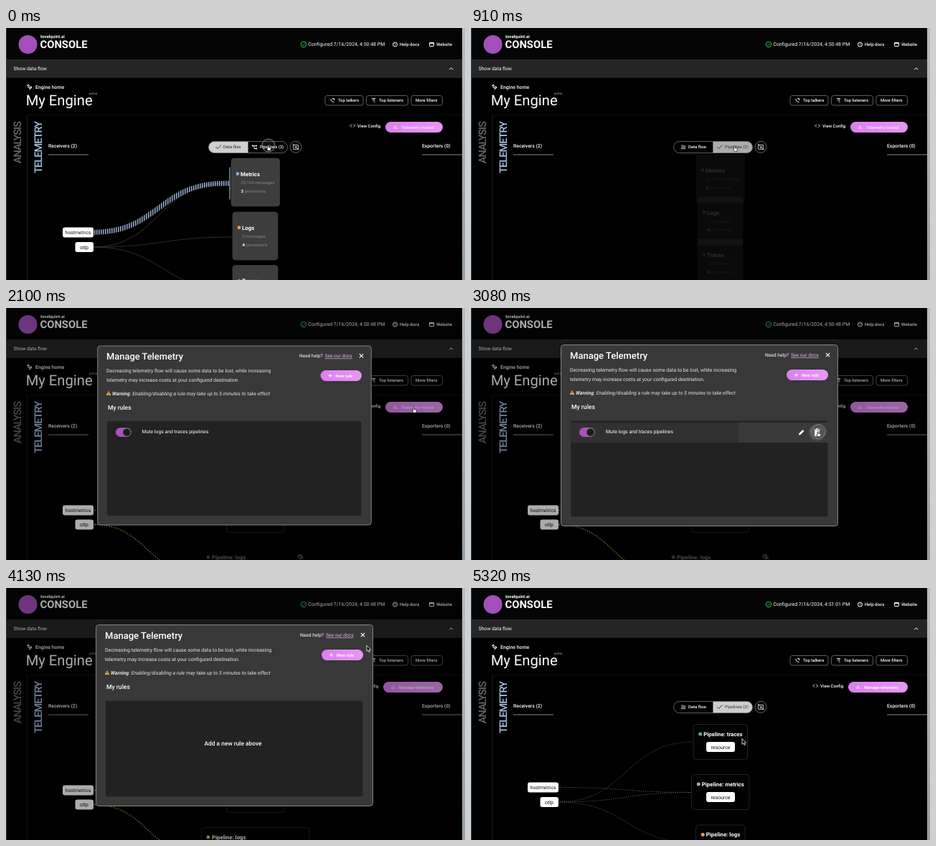
Animation of 640x352 px, one loop 5.39 s. Source, as an HTML page:

```html
<!DOCTYPE html>
<html lang="en">
<head>
<meta charset="utf-8">
<title>Console</title>
<style>
  html, body { margin: 0; width: 100%; height: 100%; overflow: hidden; background: #000; }
  svg { display: block; width: 100vw; height: 100vh; }
  text { font-family: Roboto, Arial, sans-serif; text-rendering: geometricPrecision; white-space: pre; }
</style>
</head>
<body>
<svg id="stage" viewBox="0 0 640 352"></svg>
<script>
const LOOP = 5390, STEP = 70;
const BLUE = '#8fadd9', TEAL = '#6d9fa6', GOLD = '#dda548';
const $ = id => document.getElementById(id);

// Drawing helpers; text is placed by its left edge and vertical centre.
const text = (x, y, s, size, fill = '#fff', weight = 400, more = '') =>
  `<text x="${x}" y="${(y + size * 0.36).toFixed(2)}" font-size="${size}" fill="${fill}" font-weight="${weight}" ${more}>${s}</text>`;
const box = (x, y, w, h, r, fill, stroke = 'none', more = '') =>
  `<rect x="${x}" y="${y}" width="${w}" height="${h}" rx="${r}" fill="${fill}" stroke="${stroke}" ${more}/>`;
const line = (d, stroke = '#fff', width = 1, more = '') =>
  `<path d="${d}" fill="none" stroke="${stroke}" stroke-width="${width}" ${more}/>`;
const dot = (x, y, r, fill, stroke = 'none', more = '') =>
  `<circle cx="${x}" cy="${y}" r="${r}" fill="${fill}" stroke="${stroke}" ${more}/>`;
const group = (id, body, more = '') => `<g id="${id}" ${more}>${body}</g>`;
const curve = (x1, y1, x2, y2) => {
  const m = (x1 + x2) / 2;
  return `M${x1} ${y1}C${m} ${y1} ${m} ${y2} ${x2} ${y2}`;
};
const check = (x, y, color) => line(`M${x - 3.5} ${y}l2.5 2.5l5 -5`, color, 1);
const chip = (x, y, w, label, pad, fill = '#fff', size = 7) =>
  box(x, y - 7, w, 14, 3, fill) + text(x + pad, y, label, size, '#111');

const pipeIcon = (x, y, c) =>
  line(`M${x - 3} ${y - 2}h2.5v4h3.5M${x - 0.5} ${y - 2}h3.5`, c, 0.9) + dot(x - 2.6, y - 2, 1.1, c) +
  dot(x + 2.6, y - 2, 1.1, c) + dot(x + 2.6, y + 2, 1.1, c);
const bars = (x, y) => line(`M${x - 2} ${y + 2.5}v-3M${x} ${y + 2.5}v-5M${x + 2} ${y + 2.5}v-2`, '#f7dcfb', 1);
const phone = (x, y) => line(`M${x - 2} ${y - 2}q0 4 4.5 4.5M${x} ${y - 2.5}h2.5v2.5`, '#fff', 1);
const ear = (x, y) => line(`M${x - 2.5} ${y - 2}h5M${x - 1.5} ${y}h3.5M${x} ${y + 2}l2 1`, '#fff', 1);

function header() {
  return box(0, 0, 636, 44.5, 0, '#050505') + dot(30.5, 23, 13, '#a34fb9') +
    text(48, 11.5, 'tovelquint.ai', 6.1, '#fff', 700) +
    text(47.5, 22.8, 'CONSOLE', 14.8, '#fff', 700) +
    dot(415, 23, 3.8, 'none', '#43b450') + line('M413 23l1.5 1.5l2.7 -3', '#43b450', 0.9) +
    `<g id="clock">${text(421.2, 22.8, '', 6.97)}</g>` +
    dot(542.5, 23, 3, 'none', '#fff') + text(541.2, 23, '?', 5, '#fff', 500) +
    text(549, 22.8, 'Help docs', 6.1, '#fff', 500) +
    box(590.5, 20.5, 6, 5, 0.6, 'none', '#fff') + line('M590 21.2h7', '#fff', 1.2) +
    text(600, 22.8, 'Website', 6.1, '#fff', 500) +
    box(0, 44.5, 636, 24.5, 0, '#252525') + line('M0 44.5H636M0 69H636', '#363636', 0.8) +
    text(10.5, 56.8, 'Show data flow', 6.8) + line('M618.2 58.2l2.5 -2.5l2.5 2.5', '#fff', 1);
}

function page() {
  const pill = (x, w, label, icon, tx) => box(x, 94.5, w, 13.5, 3, 'none', '#777', 'stroke-width=".8"') +
    icon + text(tx, 101.2, label, 5.95, '#fff', 500);
  const side = (x, y, s, fill) =>
    `<text transform="translate(${x} ${y}) rotate(-90)" font-size="14.5" font-weight="500" letter-spacing="-.95" fill="${fill}">${s}</text>`;
  const action = (id, x, label, fill) => group(id, box(x, 131, 609 - x, 15, 7.5, 'url(#pink)') + bars(x + 14, 138.5) +
    text(x + 22, 138.5, label, 5.95, fill, 500));
  return line('M31 79v4h5M29 81l2-2l2 2M34 81l2 2l-2 2M33 83v3.5', '#fff', 1) +
    text(41, 82.7, 'Engine home', 6.9, '#fff', 500) +
    text(27.7, 101, 'My Engine', 20.2, '#fff', 400) + text(115.5, 91.5, 'ALPHA', 3.7, '#7fa8e0', 500) +
    pill(445, 53, 'Top talkers', phone(455, 101), 463) +
    pill(502.5, 58, 'Top listeners', ear(512.5, 100.5), 520) +
    pill(565, 43.5, 'More filters', '', 571) +
    line('M29.7 352V121.5', '#1e1e1e', 1) + line('M30 121.5H636', '#0f0f0f', 1) +
    side(21.3, 189.3, 'ANALYSIS', '#686868') + side(49.8, 202.8, 'TELEMETRY', '#a8c0e6') +
    text(59, 164.8, 'Receivers (2)', 6.8, '#fff', 500) + text(580, 164.8, 'Exporters (0)', 6.8, '#fff', 500) +
    line('M59 177H115M580 177H636', '#9a9a9a', 0.9) +
    group('config', line('M482 134.5l-2 2l2 2M484.5 134.5l2 2l-2 2', '#fff', 0.9) +
      text(490, 136.6, 'View Config', 6, '#fff', 500)) +
    action('mutedBtn', 529, 'Telemetry muted', '#fbe6ff') + action('manageBtn', 526, 'Manage telemetry', '#fff');
}

function toggle() {
  const left = 'M290.5 158.5H337.5V174.5H290.5a8 8 0 0 1 0-16z';
  const right = 'M337.5 158.5H384.5a8 8 0 0 1 0 16H337.5z';
  const data = (c, w) => text(303, 166.3, 'Data flow', 5.9, c, w);
  const pipe = (c, w) => text(354, 166.3, 'Pipelines (3)', 5.9, c, w);
  const waves = line('M293 164.5q1.5-1.5 3 0t3 0M293 166.5h6M293 168.5h6', '#fff', 0.8);
  return group('onData', `<path d="${left}" fill="#cfcfcf"/>` + check(296, 166, '#333') + data('#222', 400) +
      pipeIcon(346.5, 166.5, '#fff') + pipe('#fff', 500)) +
    group('onPipe', `<path id="pipeFill" d="${right}"/>` + check(346.5, 166, '#333') + pipe('#333', 400) +
      waves + data('#fff', 500)) +
    line(left + right, '#777', 0.8) + dot(404, 166.3, 8, '#000', '#666') +
    box(400.5, 163, 7, 6.5, 0.6, 'none', '#ddd', 'stroke-width=".8"') +
    line('M400 162l8.5 8.5M402.5 167.5h3M404 165h2.5', '#ddd', 0.9);
}

function dataFlow() {
  const card = (i, y, x, w, name, count, procs, color) => `<g id="card${i}">` +
    box(x, y, w, 67, 4, '#3d3d3d', '#484848', 'stroke-width=".6"') + dot(x + 9, y + 21.7, 2.4, color) +
    text(x + 13, y + 21.7, name, 7.9, '#fff', 700) + text(x + 13.5, y + 34.3, count + ' messages', 6, '#858585') +
    text(x + 13.5, y + 46, procs, 6, '#fff', 700) + text(x + 18.5, y + 46, 'processors', 6, '#858585') + '</g>';
  return group('wires', line(curve(122, 306, 304, 217), '#3a3a3a', 0.8) + line(curve(122, 306, 316, 292), '#3a3a3a', 0.8) +
      line(curve(122, 306, 316, 366), '#3a3a3a', 0.8) +
      line(curve(122, 285.5, 304, 217) + 'H312', 'url(#stripes)', 7) +
      line('M312 194.5V239.5', '#a5bbdd', 1.1) + receivers(285.5, 306)) +
    card(0, 182, 314, 67.5, 'Metrics', '25,124', 3, BLUE) +
    card(1, 257, 316, 63, 'Logs', '0', 4, GOLD) + card(2, 331.5, 316, 63, 'Traces', '0', 4, TEAL);
}

function receivers(y1, y2) {
  return chip(79, y1, 43, 'hostmetrics', 3.8, '#fff', 6.7) + chip(96.5, y2, 25.5, 'otlp', 6.5);
}

const dots = (d, c, w) => line(d, c, w, `class="march" stroke-dasharray="${w} 2"`);

function narrow(name, x, w, y, color) {
  return box(x, y - 13.5, w, 49, 4, '#020202', '#2c2c2c', 'stroke-width=".8"') + dot(x + 9.7, y, 2.5, color) +
    text(x + 14.2, y, 'Pipeline: ' + name, 7.8, '#fff', 700) + chip(328, y + 18, 40, 'resource', 6.4);
}

function wide(name, y, color, lit) {
  const mute = line(`M407 ${y - 2}h2l2.5-2v7l-2.5-2h-2zM413 ${y - 2}q2 1.5 0 3.5M407 ${y - 4}l8 7`, '#666', 0.9);
  return (lit ? box(272.5, y - 13.5, 150.5, 49, 4, '#020202', '#2c2c2c', 'stroke-width=".8"') : mute) +
    dot(282, y, 2.5, lit ? color : '#444') + text(287, y, 'Pipeline: ' + name, 7.8, lit ? '#fff' : '#666', 700) +
    box(279.5, y + 10.5, 82.5, 18, 3, 'none', '#333') +
    box(288.5, y + 16.5, 7, 6.5, 0.6, 'none', '#444') + line(`M290.5 ${y + 18}v4M293.5 ${y + 18}v4`, '#444', 0.8) +
    text(300, y + 19.5, 'filter/mdai_muted', 7, '#444') +
    line(`M366.5 ${y + 16.5}l2.5 2.7l-2.5 2.7M369.5 ${y + 16.5}l2.5 2.7l-2.5 2.7`, '#777', 0.9) +
    chip(376, y + 19.5, 40, 'resource', 6.8, lit ? '#fff' : '#747474');
}

function filtered(id, lit) {
  return group(id, dots(curve(122, 302.5, 272, 216), '#7b898d', 1.4) + dots(curve(122, 282.5, 308, 289), '#8fa6c9', 1.4) +
    dots(curve(122, 302.5, 308, 289), '#8fa6c9', 1.4) + dots(curve(122, 302.5, 272, 372), '#bba74f', 1.4) +
    receivers(282.5, 302.5) + wide('traces', 204, TEAL, lit) + narrow('metrics', 307.5, 80.5, 278, BLUE) +
    wide('logs', 348, GOLD, lit));
}

function open() {
  return group('open', dots(curve(122, 299, 310, 215), '#5d6668', 1) + dots(curve(122, 278.5, 308, 285.5), '#677080', 1) +
    dots(curve(122, 299, 308, 285.5), '#677080', 1) + dots(curve(122, 299, 313, 356), '#65603f', 1) +
    receivers(278.5, 299) + narrow('traces', 310, 75.5, 204, TEAL) +
    narrow('metrics', 307.5, 80.5, 274, BLUE) + narrow('logs', 313.5, 68.5, 344.5, GOLD));
}

function modal() {
  const pencil = line('M457.5 177l.5-2l4.5-4.5l1.5 1.5l-4.5 4.5z', '#fff', 1, 'style="fill:#fff"');
  const bin = box(479, 171, 7, 8, 1, '#fff') + line('M478 170h9M481 168.8h3', '#fff', 1.2);
  return group('modal', box(125.5, 51.5, 386, 253, 4, '#383838', '#858585') +
    text(138, 66, 'Manage Telemetry', 13, '#fff', 500) + text(410, 65.8, 'Need help?', 6.7) +
    text(446, 65.8, 'See our docs', 6.7, '#e3b5f2', 400, 'text-decoration="underline"') +
    line('M494.8 62.8l5.4 5.4M500.2 62.8l-5.4 5.4', '#fff', 1.1) +
    text(138, 86, 'Decreasing telemetry flow will cause some data to be lost, while increasing', 7, '#e6e6e6') +
    text(138, 99.5, 'telemetry may increase costs at your configured destination.', 7, '#e6e6e6') +
    box(440, 86, 58, 15, 7.5, 'url(#pink)') + line('M451 93.5h5M453.5 91v5', '#fff', 1) +
    text(461, 93.5, 'New rule', 6.1, '#fff', 500) +
    '<path d="M141 115l3.4 6h-6.8z" fill="#f0b840"/>' + line('M141 117v2.2M141 119.7v.7', '#222', 0.8) +
    text(146, 118.5, '<tspan font-weight="700">Warning</tspan>: Enabling/disabling a rule may take up to 5 minutes to take effect',
      7, '#e6e6e6', 400, 'font-style="italic"') +
    text(140, 138, 'My rules', 8.6, '#fff', 500) + box(138.5, 157, 359.5, 135, 3, '#222', '#404040', 'stroke-width=".7"') +
    group('rule', group('hover', box(139, 160, 359, 28, 0, '#303030') + box(373, 160, 125, 28, 0, '#3a3a3a') +
        group('binHover', dot(482.5, 174, 11.5, '#505050')) + pencil + bin) +
      box(151, 167, 22, 13, 6.5, '#a555b8') + dot(166.5, 173.5, 5.2, '#1c1c1c') +
      text(188, 172.5, 'Mute logs and traces pipelines', 6.95)) +
    group('empty', text(276.5, 217, 'Add a new rule above', 8.4, '#fff', 500)));
}

const pointer = group('pointer',
  dot(0, -3, 9, 'rgba(150,150,150,.12)', '#8d8d8d', 'id="ring"') +
  '<path id="arrow" d="M0 -3.5V4.3l1.8-1.6l1.3 2.8l1.4-.6l-1.3-2.7h2.4z" fill="#000" stroke="#fff" stroke-width=".8"/>' +
  '<path id="hand" transform="scale(.85)" d="M-1.5 -3q1-1.2 1.8 0v2.5l3 .7q1 .4.7 1.6l-.8 3.2h-4l-2.6-3q.4-1 1.9-.2z" fill="#fff" stroke="#000" stroke-width=".8"/>');

const defs = `<defs>
  <linearGradient id="pink"><stop stop-color="#da80ee"/><stop offset="1" stop-color="#e797f5"/></linearGradient>
  <linearGradient id="edge" x2="0" y2="1"><stop stop-color="#b4bdc2"/><stop offset="1" stop-color="#929da4"/></linearGradient>
  <pattern id="stripes" width="3" height="8" patternUnits="userSpaceOnUse">${box(0, 0, 1.6, 8, 0, '#93a9cb')}</pattern>
</defs>`;

$('stage').innerHTML = defs +
  box(0, 0, 640, 352, 0, '#000') + header() + page() + dataFlow() + filtered('muted', false) + filtered('lit', true) +
  open() + toggle() + group('shade', box(0, 0, 636, 352, 0, '#000')) + modal() +
  box(636, 0, 4, 352, 0, 'url(#edge)') + line('M.5 0V352', '#1f3b50', 1) + pointer;

const clamp = v => Math.max(0, Math.min(1, v));
const part = (t, a, b) => clamp((t - a) / (b - a));
const smooth = p => p * p * (3 - 2 * p);
const within = (t, spans) => spans.some(([a, b]) => t >= a && t < b);
const show = (id, on) => $(id).style.display = on ? '' : 'none';
const fade = (id, v) => { show(id, v > 0); $(id).setAttribute('opacity', v); };

const PATH = [[0, 366, 167], [840, 368, 168], [1190, 368, 168], [1610, 569, 142], [2310, 569, 142], [2800, 484.5, 175.5],
  [3780, 484.5, 175.5], [4130, 503, 84], [4340, 498, 66], [4620, 498, 66], [5040, 378, 214], [LOOP, 378, 214]];
const HAND = [[0, 1250], [1540, 2380], [2730, 3880], [4270, 4560]];
const CLICKS = [0, 1750, 3010, 4410];
const marching = document.querySelectorAll('.march');
const clock = document.querySelector('#clock text');

function place(t) {
  const i = Math.max(1, PATH.findIndex(k => k[0] > t));
  const [a, x1, y1] = PATH[i - 1], [b, x2, y2] = PATH[i];
  const p = smooth(part(t, a, b));
  return [x1 + (x2 - x1) * p, y1 + (y2 - y1) * p];
}

function draw(t) {
  const removed = t >= 3360, managed = t >= 3710, updated = t >= 4900, piped = t >= 560;

  marching.forEach(m => m.setAttribute('stroke-dashoffset', -t * 0.02));
  $('stripes').setAttribute('patternTransform', `translate(${t * 0.02} 0)`);
  clock.textContent = `Configured 7/16/2024, ${updated ? '4:51:01' : '4:50:48'} PM`;

  show('onData', !piped);
  show('onPipe', piped);
  $('pipeFill').setAttribute('fill', t < 1260 ? '#adadad' : '#cecece');
  show('mutedBtn', !managed);
  show('manageBtn', managed);
  $('config').setAttribute('transform', `translate(${managed ? -3 : 0} 0)`);

  fade('wires', 1 - part(t, 630, 840));
  const slide = smooth(part(t, 630, 900)), ghost = 1 - part(t, 630, 970);
  [-5, -21, -36.5].forEach((shift, i) => {
    fade('card' + i, ghost);
    $('card' + i).setAttribute('transform', `translate(0 ${shift * slide})`);
  });
  fade('muted', managed ? 0 : part(t, 1000, 1190));
  show('lit', managed && !updated);
  fade('open', updated ? part(t, 4830, 5040) : 0);

  const rise = part(t, 2000, 2210), leave = part(t, 4550, 4700);
  const scale = 0.92 + 0.08 * (1 - (1 - rise) ** 3);
  fade('shade', 0.33 * clamp(rise * 2.1) * (1 - leave));
  fade('modal', clamp(rise * 2.1) * (1 - leave));
  $('modal').setAttribute('transform', `translate(318.5 178) scale(${scale}) translate(-318.5 -178)`);

  const [x, y] = place(t);
  show('rule', !removed);
  show('empty', removed);
  show('hover', t > 2310 && y > 160 && x < 498);
  show('binHover', t >= 2730);

  $('pointer').setAttribute('transform', `translate(${x} ${y})`);
  const hand = within(t, HAND);
  show('hand', hand);
  show('arrow', !hand);
  const age = Math.min(...CLICKS.map(c => t >= c ? t - c : LOOP));
  fade('ring', age <= 140 ? 1 - age / 350 : 0);
  $('ring').setAttribute('r', 9 + age / 70);
}

const start = performance.now();
function tick() {
  draw(Math.floor(((performance.now() - start) % LOOP) / STEP) * STEP);
  requestAnimationFrame(tick);
}
tick();
</script>
</body>
</html>
```
